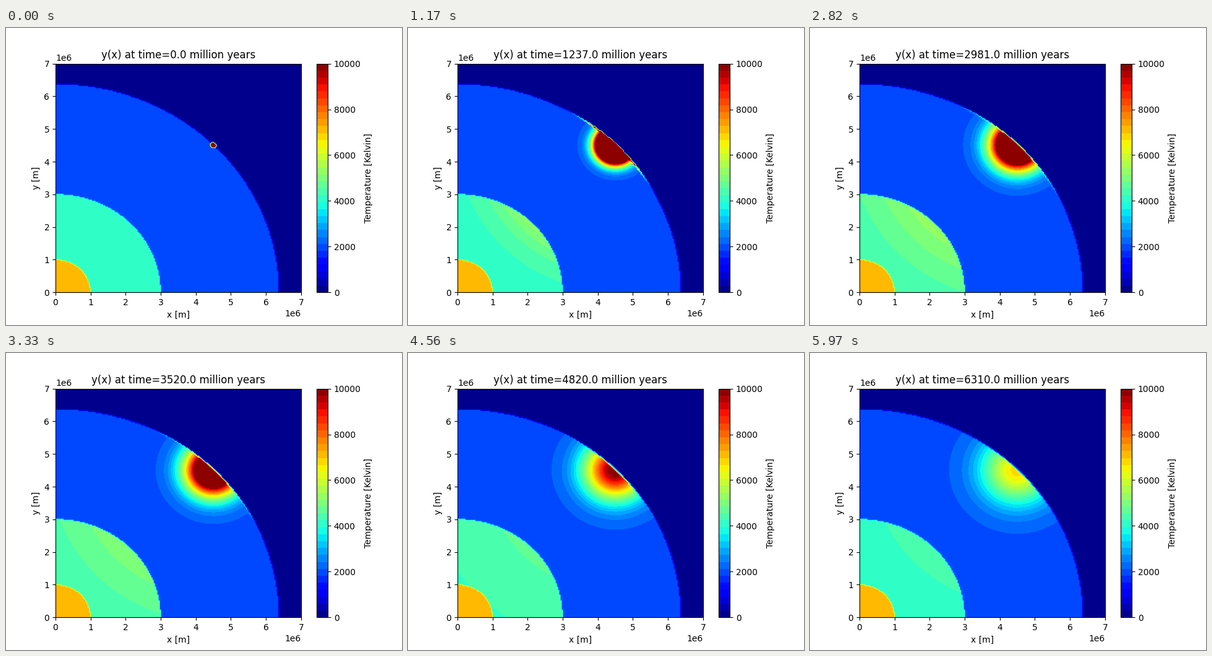
Recreate the animation shown at these times as a matplotlib script. Size 640 px wide and 480 px high, loop 6000 ms.

```python
import matplotlib.pyplot as plt
import numpy as np
from matplotlib.animation import FuncAnimation
from matplotlib.colors import ListedColormap

FRAMES, INTERVAL = 200, 30
STEP_MYR = 1e15 / 3.1536e13   # one step of 1e15 s in million years
SIZE, CELLS, BANDS = 7e6, 200, 33
SPOT = 4.5                    # hot spot position, in 1000 km

axis = np.linspace(0, SIZE / 1e6, CELLS)
X, Y = np.meshgrid(axis, axis)
R = np.hypot(X, Y)
D2 = (X - SPOT) ** 2 + (Y - SPOT) ** 2

# outer radius, base temperature, heat amplitude, spread per step, decay per step
LAYERS = [
    (1.0, 7000, 0, 1, 0),
    (3.0, 4000, 1.42e5, 0.13, 0.0155),
    (6.365, 2000, 3.56e5, 0.00517, 0.0083),
    (6.4, 500, 1.56e5, 0.027, 0.0083),
]


def layer_masks():
    inner = -1.0
    for outer, *_ in LAYERS:
        yield (R > inner) & (R <= outer)
        inner = outer


MASKS = list(layer_masks())


def temperature(n):
    """Each layer spreads the heat of the spot with its own diffusivity."""
    temp = np.zeros_like(R)
    for mask, (_, base, amp, spread, decay) in zip(MASKS, LAYERS):
        temp[mask] = base
        if n:
            peak = amp / np.sqrt(n) * np.exp(-decay * n)
            temp[mask] += peak * np.exp(-D2[mask] / (spread * n))
    if n == 0:
        temp[D2 < 0.08 ** 2] = 10000
    return temp


def title(n):
    return f"y(x) at time={round(n * STEP_MYR):.1f} million years"


plt.rcParams["font.family"] = "DejaVu Sans"
fig, ax = plt.subplots(figsize=(6.4, 4.8), dpi=100)
cmap = ListedColormap(plt.get_cmap("jet")((np.arange(BANDS) + 0.5) / BANDS))
half = SIZE / (CELLS - 1) / 2
field = ax.imshow(
    temperature(0), cmap=cmap, vmin=0, vmax=10000, origin="lower",
    extent=(-half, SIZE + half, -half, SIZE + half),
    aspect="auto", interpolation="bilinear",
)
ax.set(xlim=(0, SIZE), ylim=(0, SIZE), xlabel="x [m]", ylabel="y [m]")
ax.set_xticks(np.arange(8) * 1e6)
ax.set_yticks(np.arange(8) * 1e6)
heading = ax.set_title(title(0))
fig.colorbar(field, ax=ax, label="Temperature [Kelvin]",
             ticks=range(0, 10001, 2000))


def update(n):
    field.set_data(temperature(n))
    heading.set_text(title(n))
    return field, heading


anim = FuncAnimation(fig, update, frames=FRAMES, interval=INTERVAL,
                     repeat=True, repeat_delay=0, blit=False)
plt.show()
```
